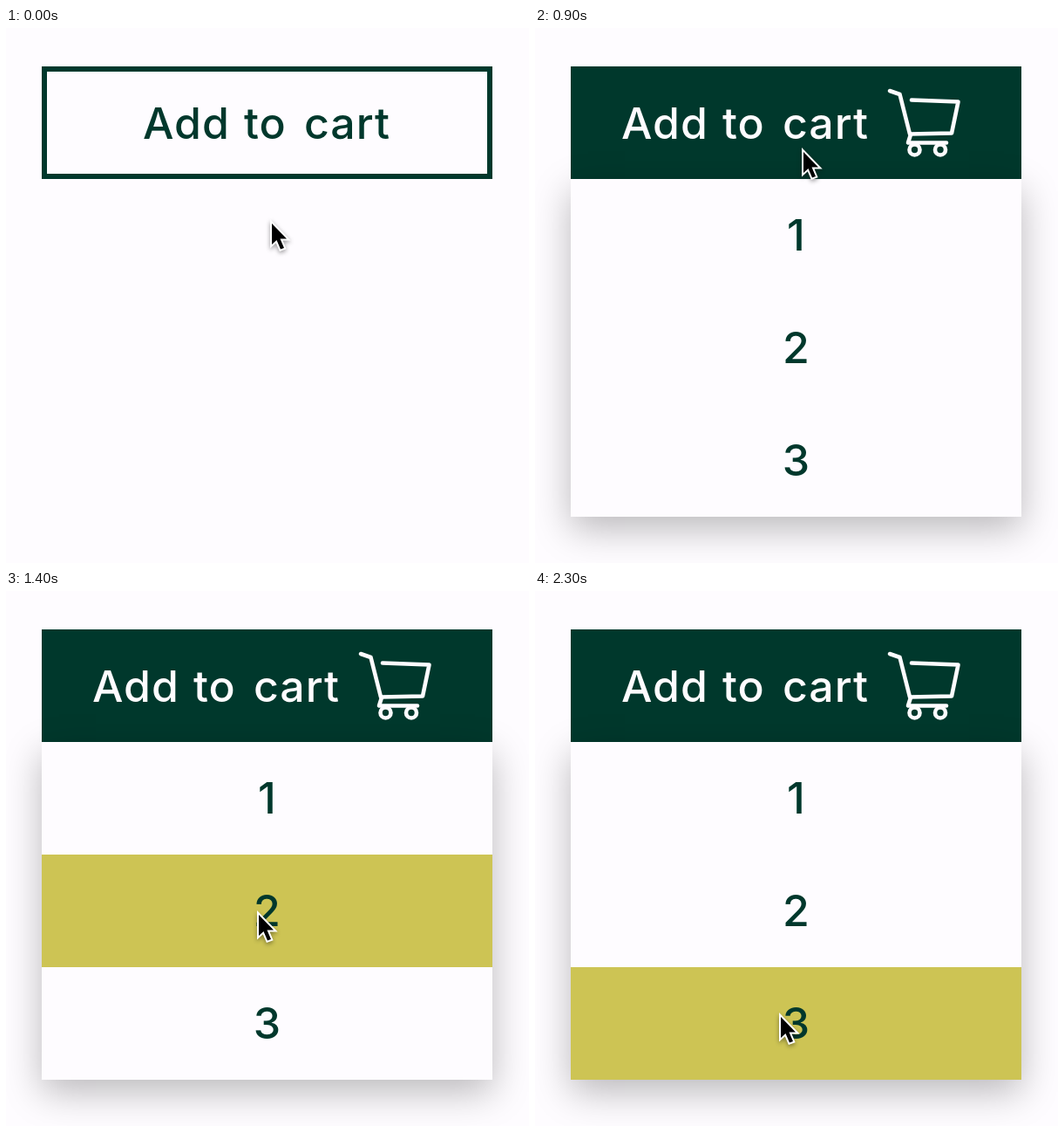
Animation, 600 px wide and 613 px high, one loop 2400 ms. Source, as an HTML page with a canvas:

```html
<!DOCTYPE html>
<html lang="en">
<head>
<meta charset="utf-8">
<title>Add to cart</title>
<style>
html, body { margin: 0; width: 100%; height: 100%; overflow: hidden; background: #fefcff; }
canvas { display: block; }
</style>
</head>
<body>
<canvas id="stage" width="600" height="613"></canvas>
<script>
const ctx = document.getElementById('stage').getContext('2d');
const LOOP = 2400, STEP = 100;
const GREEN = '#00382c', PAPER = '#fefcff', GOLD = '#cdc454';
const LEFT = 41, TOP = 44, WIDTH = 517, ROW = 129;
const MENU = TOP + ROW;

// time, x, y of the pointer tip
const PATH = [
  [0, 303, 220], [100, 304, 186], [200, 305, 151], [300, 306, 141], [500, 306, 138],
  [900, 306, 138], [1000, 304, 150], [1100, 299, 205], [1200, 293, 275], [1300, 289, 331],
  [1400, 288, 367], [1500, 286, 412], [1600, 282, 460], [1700, 280, 484]
];

const clamp = v => Math.min(1, Math.max(0, v));
const mix = (a, b, p) => a + (b - a) * p;
const part = (t, from, to) => clamp((t - from) / (to - from));
const easeOut = p => 1 - (1 - p) ** 3;

function pointerAt(t) {
  const i = PATH.findIndex(k => k[0] > t);
  if (i < 0) return PATH[PATH.length - 1].slice(1);
  const [a, b] = [PATH[i - 1], PATH[i]];
  const p = part(t, a[0], b[0]);
  return [mix(a[1], b[1], p), mix(a[2], b[2], p)];
}

function trace(points, close) {
  ctx.beginPath();
  points.forEach(([x, y]) => ctx.lineTo(x, y));
  if (close) ctx.closePath();
}

function shadow(color, blur, y) {
  ctx.shadowColor = color;
  ctx.shadowBlur = blur;
  ctx.shadowOffsetY = y;
}

function drawButton(hover, shift) {
  ctx.fillStyle = GREEN;
  ctx.globalAlpha = hover;
  ctx.fillRect(LEFT, TOP, WIDTH, ROW);
  ctx.globalAlpha = 1;
  ctx.strokeStyle = GREEN;
  ctx.lineWidth = 6;
  ctx.lineJoin = 'miter';
  ctx.strokeRect(LEFT + 3, TOP + 3, WIDTH - 6, ROW - 6);

  ctx.fillStyle = hover > 0.5 ? PAPER : GREEN;
  ctx.textAlign = 'left';
  ctx.letterSpacing = '1px';
  [['Add', 157], ['to', 273], ['cart', 342]].forEach(([word, x]) => ctx.fillText(word, x - shift, 127));
  ctx.letterSpacing = '0px';
}

function drawCart(alpha) {
  ctx.save();
  ctx.globalAlpha = alpha;
  ctx.strokeStyle = PAPER;
  ctx.lineWidth = 4.6;
  ctx.lineCap = ctx.lineJoin = 'round';
  trace([[407, 72], [418.5, 76], [430, 121.5], [478, 120.5], [485.5, 84.5], [432, 82.5]]);
  ctx.stroke();
  trace([[431, 122], [428, 131.5], [472, 131.5]]);
  ctx.stroke();
  for (const x of [435.5, 465]) {
    ctx.beginPath();
    ctx.arc(x, 139.5, 6, 0, 7);
    ctx.stroke();
  }
  ctx.restore();
}

function drawMenu(open, shade, active) {
  if (!open) return;
  const height = ROW * 3 * open;
  ctx.save();
  ctx.fillStyle = PAPER;
  shadow(`rgba(0,0,0,${0.27 * shade})`, 40, 14);
  ctx.fillRect(LEFT, MENU, WIDTH, height);
  shadow('transparent', 0, 0);
  ctx.beginPath();
  ctx.rect(LEFT, MENU, WIDTH, height);
  ctx.clip();
  ctx.textAlign = 'center';
  for (let i = 0; i < 3; i++) {
    const y = MENU + i * ROW;
    if (i === active) {
      ctx.fillStyle = GOLD;
      ctx.fillRect(LEFT, y, WIDTH, ROW);
    }
    ctx.fillStyle = GREEN;
    ctx.fillText(i + 1, 299.5, y + 82);
  }
  ctx.restore();
}

function drawPointer([x, y]) {
  ctx.save();
  ctx.translate(x, y);
  trace([[2, 4], [2, 28], [7.5, 23], [12, 33.5], [16, 32], [11.5, 21.5], [19, 21.5]], true);
  ctx.strokeStyle = '#fff';
  ctx.lineWidth = 4;
  ctx.lineJoin = 'miter';
  shadow('rgba(0,0,0,.4)', 5, 2);
  ctx.stroke();
  shadow('transparent', 0, 0);
  ctx.fillStyle = '#000';
  ctx.fill();
  ctx.restore();
}

function draw(t) {
  ctx.fillStyle = PAPER;
  ctx.fillRect(0, 0, 600, 613);
  ctx.font = '500 50px Inter, "Open Sans", sans-serif';

  // the highlight trails the pointer a little
  const trail = pointerAt(Math.max(0, t - 90))[1];
  const active = t > 900 ? Math.floor((trail - MENU) / ROW) : -1;

  drawButton(part(t, 60, 200), 58 * easeOut(part(t, 80, 390)));
  drawCart(part(t, 220, 600));
  drawMenu(easeOut(part(t, 220, 680)), part(t, 300, 850), active);
  drawPointer(pointerAt(t));
}

function tick(now) {
  draw(Math.floor(((now + 2) % LOOP) / STEP) * STEP);
  requestAnimationFrame(tick);
}
draw(0);
requestAnimationFrame(tick);
</script>
</body>
</html>
```
